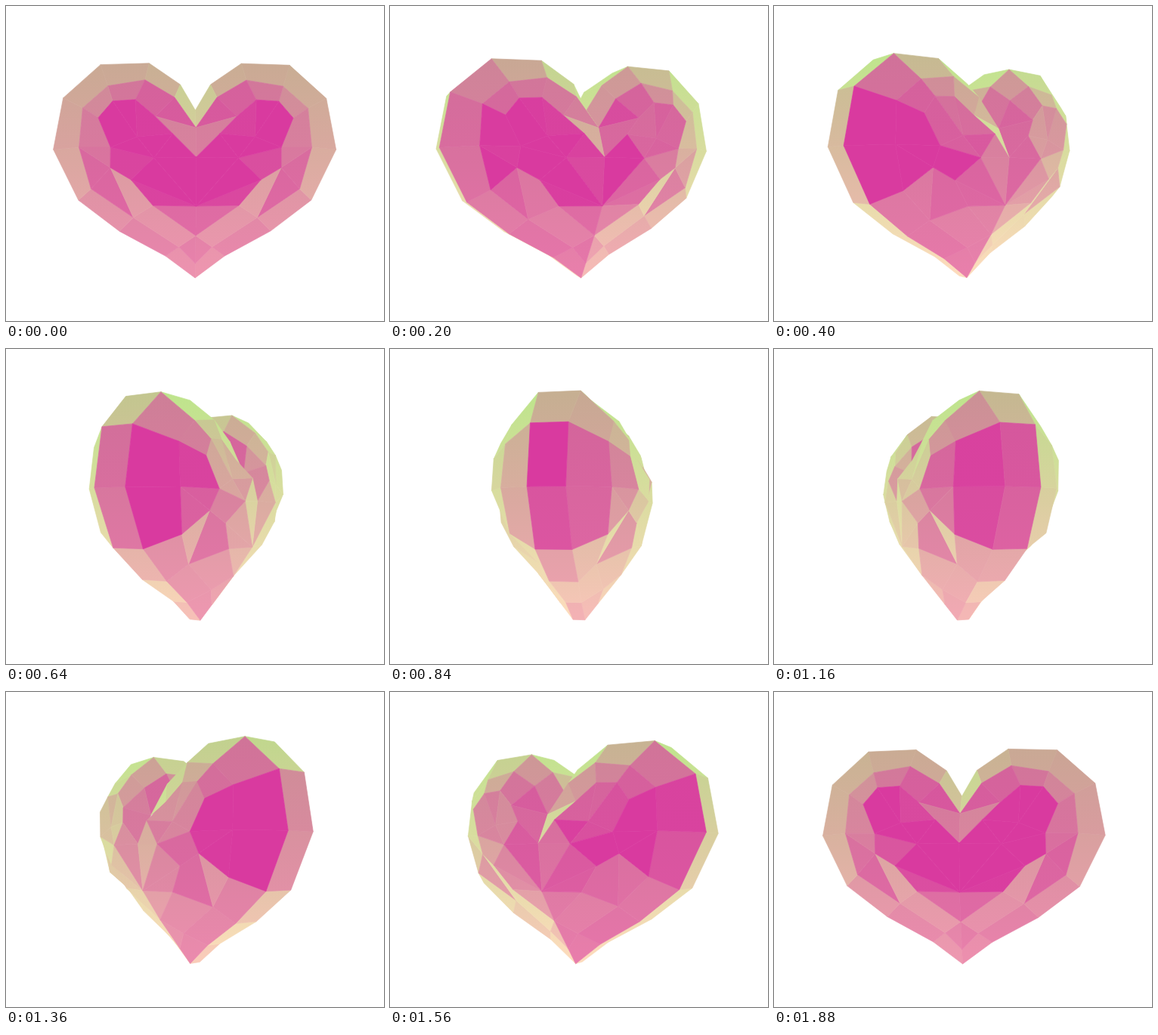
Animation of 500x417 px, one loop 1920 ms. Source, as an HTML page with a canvas:

```html
<!DOCTYPE html>
<html lang="en">
<head>
<meta charset="utf-8">
<title>Turning heart</title>
<style>
  html, body { margin: 0; width: 100%; height: 100%; overflow: hidden; background: #fff; }
  canvas { display: block; }
</style>
</head>
<body>
<canvas id="stage" width="500" height="417"></canvas>
<script>
const ctx = document.getElementById('stage').getContext('2d');
const LOOP = 1920, STEP = 40, START_ANGLE = 0.015;
const CAMERA = 735, CX = 250, CY = 219;
const MAGENTA = [217, 58, 159];
// Base tint from top to bottom of the stage.
const TINTS = [[60, [190, 228, 140]], [200, [218, 220, 160]], [350, [252, 219, 188]]];

// Left front quarter as seen head-on: screen x, screen y, depth.
const POINTS = {
  a0: [250, 138, 28], a1: [230, 104, 33], a2: [189, 76, 26], a3: [125, 78, 24], a4: [76, 122, 20],
  a5: [63, 190, 20], a6: [96, 257, 20], a7: [150, 298, 17], a8: [211, 331, 10], a9: [250, 360, 8],
  b0: [250, 161, 70], b1: [222, 121, 63], b2: [183, 98, 60], b3: [134, 106, 59], b4: [101, 135, 57],
  b5: [96, 187, 61], b6: [112, 242, 55], b7: [168, 280, 35],
  c0: [250, 200, 89], c1: [196, 146, 81], c2: [170, 124, 75], c3: [140, 126, 75], c4: [121, 148, 78],
  c5: [137, 187, 86], c6: [137, 214, 75],
  p: [194, 201, 94], q: [219, 169, 94], r: [172, 173, 87], s: [164, 230, 82],
  g: [193, 264, 74], d: [250, 265, 82], e: [250, 304, 56], h: [228, 319, 35], f: [250, 341, 25]
};

const FACES = [
  'a0 a1 b1 b0', 'a1 a2 b2 b1', 'a2 a3 b3 b2', 'a3 a4 b4 b3', 'a4 a5 b5 b4', 'a5 a6 b6 b5',
  'a6 a7 b7 b6', 'a7 a8 h b7', 'b7 h e g', 'a8 a9 f h', 'e h f',
  'b1 b2 c2 c1', 'b2 b3 c3 c2', 'b3 b4 c4 c3', 'b4 b5 c5 c4', 'b5 c6 c5', 'b5 b6 c6', 'b6 b7 c6',
  'c6 b7 g s', 'b0 b1 c1', 'b0 c1 q c0',
  'c1 c2 r q', 'c2 c3 r', 'c3 c4 c5 r', 'c5 p r', 'r p q', 'q p c0',
  'c5 c6 s p', 'c0 p d', 'p s d', 's g d', 'g e d'
];

function area(pts) {
  return pts.reduce((sum, [x, y], i) => {
    const [u, v] = pts[(i + 1) % pts.length];
    return sum + x * v - u * y;
  }, 0);
}

// Undo the head-on perspective to get model space.
function toModel([x, y, z]) {
  const k = (CAMERA - z) / CAMERA;
  return [(x - CX) * k, (y - CY) * k, z];
}

const flip = (face, axis) =>
  face.map(v => v.map((n, i) => i === axis ? -n : n)).reverse();

function buildMesh() {
  const front = FACES.map(text => {
    const pts = text.split(' ').map(name => POINTS[name]);
    if (area(pts) < 0) pts.reverse();
    return pts.map(toModel);
  });
  const rim = [];
  for (let i = 0; i < 9; i++) {
    const a = toModel(POINTS['a' + i]), b = toModel(POINTS['a' + (i + 1)]);
    rim.push([a, b, [b[0], b[1], -b[2]], [a[0], a[1], -a[2]]]);
  }
  const left = [...front, ...front.map(face => flip(face, 2)), ...rim];
  return [...left, ...left.map(face => flip(face, 0))];
}

const mesh = buildMesh();

function turn([x, y, z], angle) {
  const c = Math.cos(angle), s = Math.sin(angle);
  return [x * c + z * s, y, z * c - x * s];
}

function project([x, y, z]) {
  const k = CAMERA / (CAMERA - z);
  return [CX + x * k, CY + y * k];
}

const clamp = n => Math.min(1, Math.max(0, n));
const sub = (a, b) => a.map((n, i) => n - b[i]);
const dot = (a, b) => a[0] * b[0] + a[1] * b[1] + a[2] * b[2];
const cross = (a, b) => [
  a[1] * b[2] - a[2] * b[1],
  a[2] * b[0] - a[0] * b[2],
  a[0] * b[1] - a[1] * b[0]
];

function centre(face) {
  return [0, 1, 2].map(i => face.reduce((sum, v) => sum + v[i], 0) / face.length);
}

// Cosine between the facet normal and the line of sight.
function facing(face, mid) {
  const n = face.length === 4
    ? cross(sub(face[2], face[0]), sub(face[3], face[1]))
    : cross(sub(face[1], face[0]), sub(face[2], face[0]));
  const view = sub([0, 0, CAMERA], mid);
  return dot(n, view) / (Math.hypot(...n) * Math.hypot(...view));
}

// Facets that nearly face the viewer jump to full magenta.
function paint(cosine) {
  const amount = clamp(1.35 * cosine - 0.34 + 0.15 * clamp((cosine - 0.87) / 0.05));
  const [top, bottom] = [TINTS[0][0], TINTS[2][0]];
  const fill = ctx.createLinearGradient(0, top, 0, bottom);
  for (const [y, tint] of TINTS) {
    const rgb = tint.map((n, i) => Math.round(n + (MAGENTA[i] - n) * amount));
    fill.addColorStop((y - top) / (bottom - top), `rgb(${rgb})`);
  }
  return fill;
}

function draw(angle) {
  ctx.fillStyle = '#fff';
  ctx.fillRect(0, 0, 500, 417);
  ctx.lineWidth = 0.7;
  ctx.lineJoin = 'round';
  mesh
    .map(face => {
      const solid = face.map(v => turn(v, angle));
      return { solid, flat: solid.map(project), mid: centre(solid) };
    })
    .filter(face => area(face.flat) > 0)
    .sort((a, b) => a.mid[2] - b.mid[2])
    .forEach(({ solid, flat, mid }) => {
      ctx.beginPath();
      flat.forEach(([x, y]) => ctx.lineTo(x, y));
      ctx.closePath();
      ctx.fillStyle = ctx.strokeStyle = paint(facing(solid, mid));
      ctx.fill();
      ctx.stroke();
    });
}

const start = performance.now();
function frame() {
  const time = (performance.now() - start) % LOOP;
  draw(START_ANGLE + Math.floor(time / STEP) * STEP / LOOP * Math.PI);
  requestAnimationFrame(frame);
}
frame();
</script>
</body>
</html>
```
